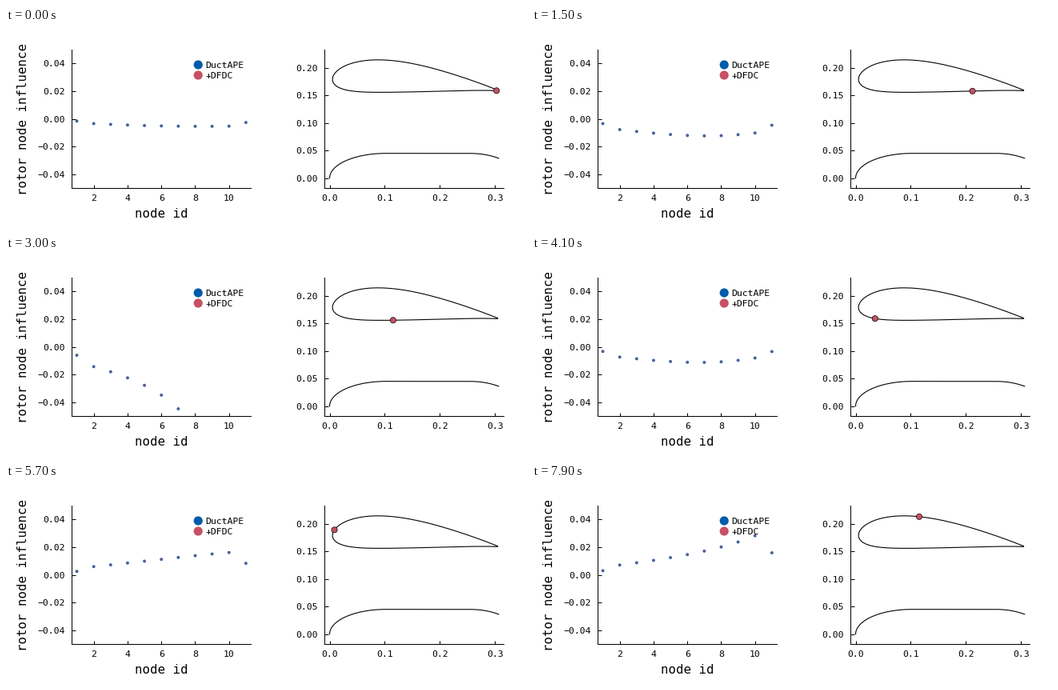
These frames come from a looping animation (650x250 px, 8 s). A matplotlib script:

```python
import numpy as np
import matplotlib.pyplot as plt
from matplotlib.animation import FuncAnimation
from matplotlib.patches import Circle
from matplotlib.transforms import Affine2D

W, H, DPI = 650, 250, 100
FRAMES, INTERVAL = 80, 100
BLUE, RED = "#005bab", "#c65163"
PX = 72 / DPI  # points per pixel

plt.rcParams.update({
    "font.family": "DejaVu Sans Mono",
    "axes.linewidth": PX,
    "axes.spines.top": False,
    "axes.spines.right": False,
})

# duct section: x is quadratic in u, r a polynomial in u;
# u runs from -1 (inner trailing edge) over 0 (nose) to 1 (outer)
NOSE_X, CHORD = .0052, .2993
DUCT_R = [.15844, .15733, .15565, .15658, .16398, .1790,
          .19725, .21131, .21311, .19637, .15953]
duct_r = np.polynomial.Polynomial.fit(np.linspace(-1, 1, 11), DUCT_R, 10)
duct_slope = duct_r.deriv()

# centre body: elliptic nose, flat middle, drooping tail
HUB_R, HUB_NOSE, TAIL_X, HUB_END = .0449, .102, .2486, .3064


def duct(u):
    return NOSE_X + CHORD * u**2, duct_r(u)


def duct_normal(u):
    n = np.array([-duct_slope(u), 2 * CHORD * u])
    return n / np.hypot(*n)


def hub(n=80):
    a = np.linspace(0, np.pi / 2, n)
    w = np.linspace(0, 1, n)
    x = np.r_[HUB_NOSE * (1 - np.cos(a)), TAIL_X + (HUB_END - TAIL_X) * w]
    r = np.r_[HUB_R * np.sin(a), HUB_R - .009 * w**2.4]
    return x, r


def probe_u(k):
    """Even steps up to the rotor, then round the nose and slowing down."""
    if k <= 30:
        x = .3025 - .00584 * k - 1.36e-5 * k**2
        return -np.sqrt((x - NOSE_X) / CHORD)
    t = k - 52.9
    return .0266 * t if t < 0 else .782 * np.sin(.034 * t)


# rotor source sheet split into linear panels
ROTOR_X, TIP_R = .12, .15572
SUB, N_THETA = 10, 240
nodes = np.linspace(HUB_R, TIP_R, 11)
gap = nodes[1] - nodes[0]
dr = gap / SUB
ring = nodes[0] + dr * (np.arange(10 * SUB) + .5)
hats = np.clip(1 - abs(ring - nodes[:, None]) / gap, 0, None) * dr
theta = (np.arange(N_THETA) + .5) * np.pi / N_THETA


def influence(pos, normal):
    """Normal velocity at pos from each node's ring sources."""
    dx = pos[0] - ROTOR_X
    dy = pos[1] - ring[:, None] * np.cos(theta)
    dz = ring[:, None] * np.sin(theta)
    dist = np.sqrt(dx**2 + dy**2 + dz**2)
    flux = (dx * normal[0] + dy * normal[1]) / dist**3
    return hats @ (ring * flux.sum(axis=1) / (2 * N_THETA))


fig = plt.figure(figsize=(W / DPI, H / DPI), dpi=DPI, facecolor="white")
PIXELS = Affine2D().scale(1 / W, -1 / H).translate(0, 1) + fig.transFigure


def panel(x, xlim, ylim, xticks, yticks, xfmt, yfmt):
    ax = fig.add_axes([x / W, 49.8 / H, 224 / W, 173 / H])
    ax.set(xlim=xlim, ylim=ylim)
    ax.set_xticks(xticks, [xfmt.format(v) for v in xticks])
    ax.set_yticks(yticks, [yfmt.format(v).replace("-", "\u2212")
                           for v in yticks])
    ax.tick_params(direction="in", length=4.5 * PX, width=PX,
                   labelsize=11.5 * PX)
    ax.tick_params(axis="x", pad=7.4 * PX)
    ax.tick_params(axis="y", pad=8.2 * PX)
    return ax


def label(x, y, text, size, **kw):
    fig.text(x, y, text, fontsize=size * PX, transform=PIXELS, **kw)


def key(y, color, text):
    fig.add_artist(Circle((240.2, y), 5.6, color=color, lw=0,
                          transform=PIXELS))
    label(249.3, y + 4.3, text, 11.5, va="baseline")


left = panel(82.2, (.7, 11.3), (-.05, .05), range(2, 11, 2),
             [-.04, -.02, 0, .02, .04], "{}", "{:.2f}")
right = panel(398.2, (-.00919, .31564), (-.01825, .23265), [0, .1, .2, .3],
              [0, .05, .1, .15, .2], "{:.1f}", "{:.2f}")

label(194.5, 237, "node id", 15.8, ha="center", va="baseline")
label(22, 114, "rotor node influence", 15.8, ha="center", va="center",
      rotation=90)
key(46, BLUE, "DuctAPE")
key(59, RED, "+DFDC")

for curve in (duct(np.linspace(-1, 1, 600)), hub()):
    right.plot(*curve, color="black", lw=1.1 * PX)
probe = right.add_patch(Circle((0, 0), 3.6 * .32483 / 224, fc=RED,
                               ec="black", lw=.7 * PX, zorder=5))

# a red core inside each blue dot
ids = np.tile(np.arange(1, 12), 2)
sizes = np.repeat([3.8 * PX, 2 * PX], 11)**2
dots = left.scatter(ids, 0 * ids, s=sizes, c=np.repeat([BLUE, RED], 11),
                    linewidths=0)


def draw(k):
    u = probe_u(k)
    pos = duct(u)
    probe.center = pos
    values = influence(pos, duct_normal(u))
    dots.set_offsets(np.c_[ids, np.tile(values, 2)])
    return probe, dots


anim = FuncAnimation(fig, draw, frames=FRAMES, interval=INTERVAL,
                     repeat=True, repeat_delay=0)
plt.show()
```
